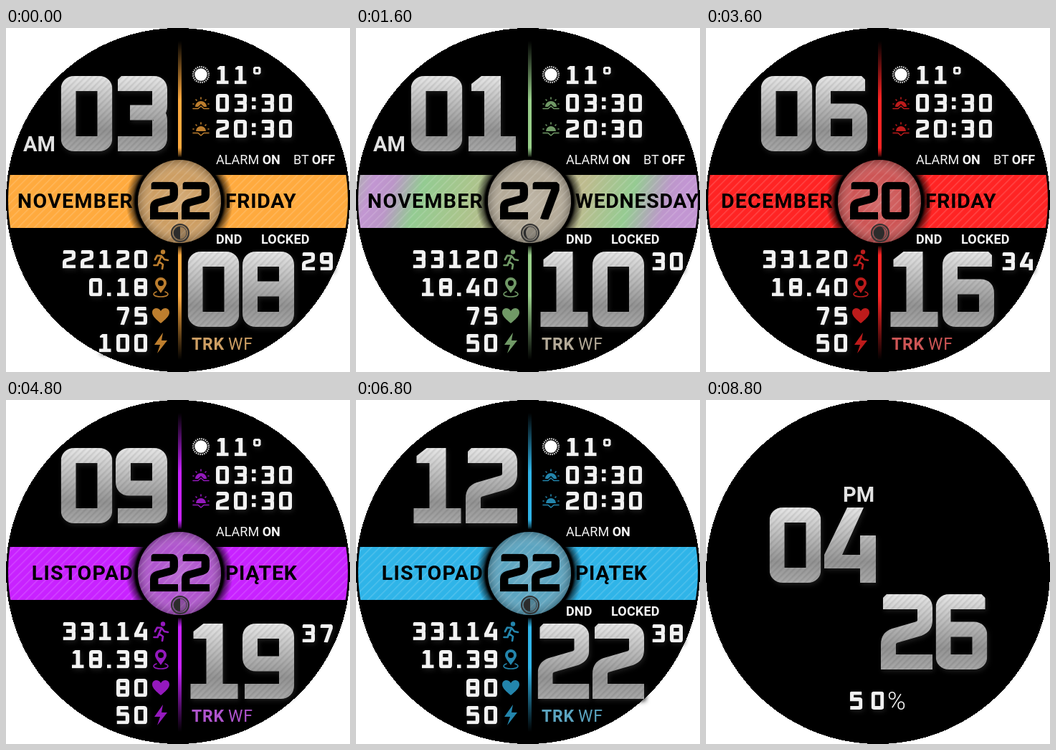
Animation, 480 px wide and 480 px high, one loop 9.6 s. Source, as an HTML page:

```html
<!DOCTYPE html>
<html lang="en">
<head>
<meta charset="utf-8">
<title>Watch face</title>
<style>
html, body { margin: 0; width: 100%; height: 100%; overflow: hidden; background: #fff; }
svg { display: block; width: 100vw; height: 100vh; }
text { font-family: Roboto, Inter, sans-serif; font-weight: 700; fill: #f4f4f4; font-size: 18px; }
.thin { font-weight: 400; }
.band { font-size: 28.5px; fill: #000; }
.half { font-size: 29px; fill: #e2e2e2; }
.track { font-size: 23px; fill: var(--soft); letter-spacing: .8px; }
.icon { fill: var(--dark); stroke: none; }
.line { fill: none; stroke: var(--dark); stroke-width: 1.6; stroke-linecap: round; stroke-linejoin: round; }
.halo { filter: drop-shadow(2px 3px 3px #1a1a1a); }
.up, .down { stop-color: var(--main); }
</style>
</head>
<body>
<svg viewBox="0 0 480 480">
  <defs>
    <clipPath id="disc"><circle id="edge" cx="240" cy="240" r="237"/></clipPath>
    <clipPath id="bevel"><path d="M0 8L8 0H64L72 8V105H0Z"/></clipPath>
    <linearGradient id="metal" gradientUnits="userSpaceOnUse" x1="0" y1="0" x2="0" y2="105">
      <stop stop-color="#e6e6e6"/><stop offset=".3" stop-color="#c4c4c4"/>
      <stop offset=".72" stop-color="#939393"/><stop offset="1" stop-color="#a8a8a8"/>
    </linearGradient>
    <linearGradient id="multi" gradientUnits="userSpaceOnUse" x1="0" y1="205" x2="420" y2="340">
      <stop stop-color="#aeb0b0"/><stop offset=".06" stop-color="#c296d2"/>
      <stop offset=".12" stop-color="#bb96c8"/><stop offset=".21" stop-color="#93cb92"/>
      <stop offset=".35" stop-color="#a9c58c"/><stop offset=".5" stop-color="#beb78e"/>
      <stop offset=".7" stop-color="#bdbb8e"/><stop offset=".85" stop-color="#95cb92"/>
      <stop offset=".96" stop-color="#bd97cb"/><stop offset="1" stop-color="#c296d2"/>
    </linearGradient>
    <linearGradient id="fadeUp" x1="0" y1="1" x2="0" y2="0">
      <stop class="up" offset=".5"/><stop class="up" offset="1" stop-opacity="0"/>
    </linearGradient>
    <linearGradient id="fadeDown" x1="0" y1="0" x2="0" y2="1">
      <stop class="down" offset=".45"/><stop class="down" offset="1" stop-opacity="0"/>
    </linearGradient>
    <radialGradient id="shade">
      <stop offset=".82" stop-color="#000"/><stop offset=".87" stop-color="#000" stop-opacity=".6"/>
      <stop offset="1" stop-color="#000" stop-opacity="0"/>
    </radialGradient>
    <radialGradient id="dome">
      <stop stop-color="#fff" stop-opacity=".14"/><stop offset=".65" stop-color="#fff" stop-opacity="0"/>
      <stop offset="1" stop-color="#000" stop-opacity=".28"/>
    </radialGradient>
    <pattern id="hatch" width="8" height="8" patternUnits="userSpaceOnUse" patternTransform="rotate(45)">
      <rect width="1.4" height="8" fill="#fff" opacity=".17"/>
    </pattern>
    <pattern id="grain" width="6" height="6" patternUnits="userSpaceOnUse" patternTransform="rotate(45)">
      <rect width="2.5" height="6" fill="#000" opacity=".08"/>
    </pattern>
  </defs>

  <circle cx="240" cy="240" r="240" shape-rendering="crispEdges"/>

  <g id="main">
    <g clip-path="url(#disc)">
      <rect id="strip" y="205" width="480" height="74"/>
      <rect y="205" width="480" height="74" fill="url(#hatch)"/>
    </g>
    <rect x="240" y="18" width="5" height="166" fill="url(#fadeUp)"/>
    <rect x="240" y="300" width="5" height="163" fill="url(#fadeDown)"/>
    <circle cx="242" cy="242" r="75" fill="url(#shade)"/>
    <circle cx="242" cy="242" r="58" style="fill:var(--soft)"/>
    <circle cx="242" cy="242" r="58" fill="url(#dome)"/>
    <circle cx="242" cy="242" r="58" fill="url(#hatch)"/>
    <circle cx="243" cy="286" r="12" fill="#333" fill-opacity=".3" stroke="#333" stroke-width="2"/>
    <circle cx="243" cy="286" r="9" fill="none" stroke="#444"/>
    <path id="moon" fill="#2c2c2c"/>

    <text id="month" class="band" x="178" y="251" text-anchor="end" letter-spacing="1.3"></text>
    <text id="week" class="band" x="306" y="251" letter-spacing=".7"></text>
    <text id="am" class="half" x="24" y="172">AM</text>
    <text x="293" y="190"><tspan class="thin">ALARM </tspan><tspan id="on"></tspan></text>
    <text id="bt" x="401" y="190"><tspan class="thin">BT </tspan>OFF</text>
    <g id="flags" letter-spacing=".15"><text x="293" y="301">DND</text><text x="356" y="301">LOCKED</text></g>
    <text class="track" x="259" y="449">TRK</text>
    <text class="track thin" x="310" y="449">WF</text>

    <circle cx="272" cy="65" r="8.7" fill="#fff"/>
    <circle cx="272" cy="65" r="10.9" fill="none" stroke="#ddd" stroke-width="2.4" stroke-dasharray="1.5 1.35"/>
    <g transform="translate(272 105)">
      <path class="icon" d="M-8 5A8 8 0 0 1 8 5L4 5L0 1L-4 5Z"/>
      <path class="line" d="M-11 7.5H-4L0 4L4 7.5H11M0 -8V-6M-7 -5L-6 -4M7 -5L6 -4M-11 1H-10M11 1H10"/>
    </g>
    <g transform="translate(272 141)">
      <path class="icon" d="M-7 3A7 7 0 0 1 7 3Z"/>
      <path class="line" d="M-11 5.5H-4L0 9L4 5.5H11M0 -9V-7M-7 -6L-6 -5M7 -6L6 -5M-11 0H-10M11 0H10"/>
    </g>
    <circle class="icon" cx="219" cy="312.5" r="3.2"/>
    <path class="line" style="stroke-width:2.7" d="M208 323L211 317.5L217 318L221 323L226 324M217 318L213.5 326L219 330L218 336M213.5 326L211.5 331L206.5 331"/>
    <path class="icon" fill-rule="evenodd" d="M216 370C212 364 208 360 208 356A8 8 0 0 1 224 356C224 360 220 364 216 370ZM216 352A4 4 0 0 0 216 360A4 4 0 0 0 216 352Z"/>
    <path class="line" d="M210 368C202 371 207 375 216 375S230 371 222 368"/>
    <path class="icon" d="M216 412C210 407 204 402 204 397C204 390 213 389 216 395C219 389 228 390 228 397C228 402 222 407 216 412Z"/>
    <path class="icon" d="M219 425L207 442H215L211 454L225 436H217Z"/>
    <g id="date"></g>
    <g id="digits" class="halo"></g>
  </g>

  <g id="dim">
    <text class="half" x="191" y="142">PM</text>
    <text x="253" y="432" style="font-size:35px;font-weight:300">%</text>
    <g id="dimDigits" class="halo"></g>
  </g>
</svg>
<script>
const $ = id => document.getElementById(id);

// Numerals on a 72 x 105 grid; those in SOLID are filled, the rest stroked.
const SOLID = "14.:°";
const GLYPHS = {
  0: "M19 10.5H53Q61.5 10.5 61.5 19V86Q61.5 94.5 53 94.5H19Q10.5 94.5 10.5 86V19Q10.5 10.5 19 10.5Z",
  1: "M8 11L22 0H49V84H70V105H4V84H26V21H8Z",
  2: "M3 10.5H53Q61.5 10.5 61.5 19V36Q61.5 45 53 48L19 58Q10.5 61 10.5 70V94.5H72",
  3: "M3 10.5H53Q61.5 10.5 61.5 19V42Q61.5 51 53 51H20M53 52Q61.5 52 61.5 62V86Q61.5 94.5 53 94.5H3",
  4: "M32 0H55L25 66H50V39H72V105H50V85H0V66Z",
  5: "M67 10.5H12V46H53Q61.5 46 61.5 55V86Q61.5 94.5 53 94.5H3",
  6: "M69 10.5H19Q10.5 10.5 10.5 19V86Q10.5 94.5 19 94.5H53Q61.5 94.5 61.5 86V58Q61.5 49 53 49H12",
  7: "M3 10.5H61V22L32 105",
  9: "M3 94.5H53Q61.5 94.5 61.5 86V19Q61.5 10.5 53 10.5H19Q10.5 10.5 10.5 19V47Q10.5 56 19 56H60",
  ".": "M0 83H22V105H0Z",
  ":": "M0 20H22V42H0ZM0 66H22V88H0Z",
  "°": "M16 4H42L50 12V40L42 48H16L8 40V12ZM21 16V36H37V16Z"
};
GLYPHS[8] = GLYPHS[0] + "M12 52H60";

function glyph(ch, paint) {
  const look = SOLID.includes(ch)
    ? `fill="${paint}" fill-rule="evenodd"`
    : `fill="none" stroke="${paint}" stroke-width="21"`;
  return `<path d="${GLYPHS[ch]}" ${look}/>`;
}

function number(str, x, y, w, h, step, paints) {
  let out = "";
  for (const ch of str) {
    out += `<g transform="translate(${x} ${y}) scale(${w / 72} ${h / 105})"><g clip-path="url(#bevel)">`
      + paints.map(p => glyph(ch, p)).join("") + "</g></g>";
    x += ".:".includes(ch) ? step * .52 : step;
  }
  return out;
}
const big = (s, x, y) => number(s, x, y, 72, 105, 76.5, ["url(#metal)", "url(#grain)"]);
const small = (s, x, y) => number(s, x, y, 18, 25.5, 25, ["#f2f2f2"]);
const smallRight = (s, y) =>
  small(s, 204 - [...s].reduce((n, ch) => n + (ch === "." ? 13 : 25), 0), y);

function mix(a, b, t) {
  const part = (c, i) => parseInt(c.slice(i, i + 2), 16);
  return `rgb(${[1, 3, 5].map(i => Math.round(part(a, i) * (1 - t) + part(b, i) * t))})`;
}

// month, date, weekday, steps, distance, pulse, battery, moon bulge
const DAYS = {
  A: ["NOVEMBER", "22", "FRIDAY", "22120", "0.18", "75", "100", 0],
  B: ["NOVEMBER", "27", "WEDNESDAY", "33120", "18.40", "75", "50", -6],
  C: ["DECEMBER", "20", "FRIDAY", "33120", "18.40", "75", "50", 6],
  D: ["LISTOPAD", "22", "PIĄTEK", "33114", "18.39", "80", "50", 0]
};

// start, hours, minutes, seconds, colour, day
const STEPS = `
0 03 08 29 #ffaa3e A
800 03 08 29 #ffd84a A
1200 12 09 30 #a4dc5c B
1600 01 10 30 #98cf8a B
2000 02 12 31 #5fd08a B
2400 03 13 32 #3ecfd0 B
2800 04 14 32 #3c9cff C
3200 05 15 33 #ff7a30 C
3600 06 16 34 #ff2424 C
4000 07 17 35 #ff2a8a C
4400 08 18 36 #f02ad0 D
4800 09 19 37 #c822ff D
5600 10 20 37 #9433ff D
6000 11 21 37 #6644ff D
6400 12 22 38 #3a6cff D
6800 12 22 38 #2fb4e8 D
7200 13 23 38 #3cc48a D
7600 14 24 39 #e06262 D
8000 15 25 39 #d09060 D
8400 16 25 40 #b0b0b0 D
8800 04 26 40 #000000 D`.trim().split("\n").map(row => row.split(" "));
const LOOP = 9600;

const show = (id, on) => { $(id).style.display = on ? "" : "none"; };

function draw([start, hh, mm, ss, colour, key]) {
  const t = +start, dim = t >= 8800, multi = t === 1600;
  show("main", !dim);
  show("dim", dim);
  if (dim) {
    $("dimDigits").innerHTML = big(hh, 88.5, 150) + big(mm, 244, 271)
      + number("50", 200.5, 406.5, 18, 25.5, 30, ["#f2f2f2"]);
    return;
  }
  const [month, date, week, steps, far, pulse, power, bulge] = DAYS[key];
  // On the root, so that the gradients in defs see the colours too.
  const style = document.documentElement.style;
  style.setProperty("--main", colour);
  style.setProperty("--dark", mix(colour, "#000000", .26));
  style.setProperty("--soft", multi ? "#b4aa98" : mix(colour, "#909090", .45));
  $("strip").setAttribute("fill", multi ? "url(#multi)" : colour);
  $("edge").setAttribute("r", t === 6000 ? 240 : 237);
  $("month").textContent = month;
  $("week").textContent = week;
  $("on").textContent = t >= 7200 ? "WŁ" : "ON";
  show("am", key < "C" && t <= 2000);
  show("bt", key !== "D");
  show("flags", key !== "D" || t >= 6800);
  $("moon").setAttribute("d",
    `M243 277A9 9 0 0 0 243 295A${Math.abs(bulge)} 9 0 0 ${bulge < 0 ? 1 : 0} 243 277Z`);
  $("date").innerHTML = number(date, 201, 214.5, 39, 53, 44, ["#000"]);
  $("digits").innerHTML = big(hh, 76.5, 67) + big(mm, 253.5, 312)
    + small("11°", 293, 53) + small("03:30", 293, 92) + small("20:30", 293, 128)
    + small(ss, 413, 313)
    + smallRight(steps, 310) + smallRight(far, 349)
    + smallRight(pulse, 389) + smallRight(power, 427);
}

let last = null;
function tick() {
  const now = performance.now() % LOOP;
  const step = STEPS.filter(s => +s[0] <= now).pop();
  if (step !== last) draw(last = step);
  requestAnimationFrame(tick);
}
tick();
</script>
</body>
</html>
```
